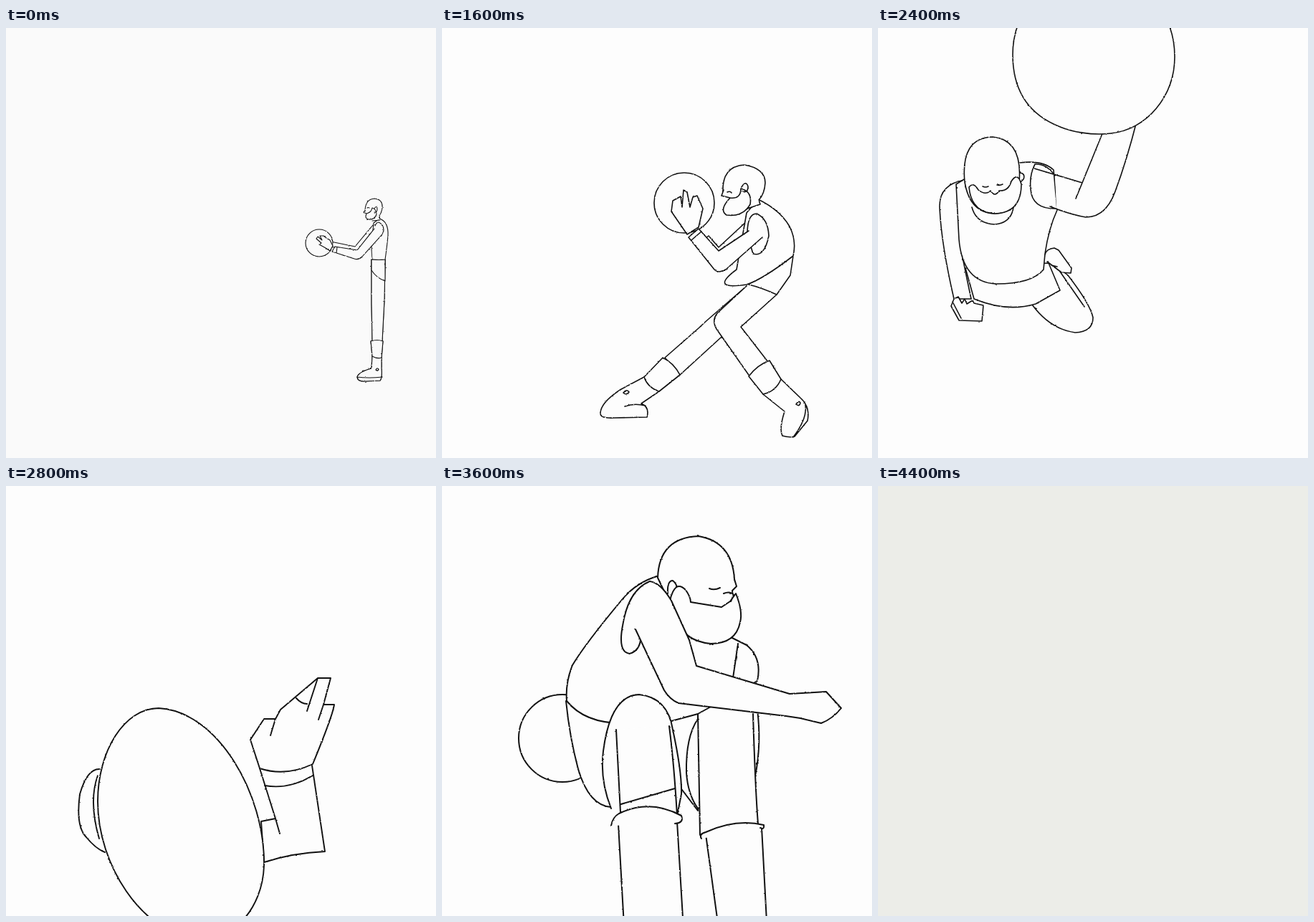
Write an HTML page that moves like this. It is 600 px wide and 600 px high and loops after 4.5 s.

```html
<!DOCTYPE html>
<html lang="en">
<head>
<meta charset="utf-8">
<title>Dunk</title>
<style>
  html, body { margin: 0; height: 100%; overflow: hidden; }
  svg { display: block; width: 600px; height: 600px; background: currentColor; }
  path { fill: currentColor; stroke: #111; stroke-linejoin: round; stroke-linecap: round; vector-effect: non-scaling-stroke; }
</style>
</head>
<body>
<svg id="stage" viewBox="0 0 600 600">
  <filter id="ink" filterUnits="userSpaceOnUse" x="0" y="0" width="600" height="600" color-interpolation-filters="sRGB">
    <feTurbulence type="fractalNoise" baseFrequency=".3" numOctaves="2" seed="4"/>
    <feDisplacementMap in="SourceGraphic" scale="2" xChannelSelector="R" yChannelSelector="G"/>
  </filter>
  <g filter="url(#ink)"><g id="figure"></g></g>
</svg>
<script>
const stage = document.getElementById('stage');
const figure = document.getElementById('figure');

const circle = (x, y, r) =>
  `M${x - r} ${y}a${r} ${r} 0 1 0 ${2 * r} 0a${r} ${r} 0 1 0 ${-2 * r} 0Z`;

// Side view, back to front. Each part: standing, lunge, gather.
const hips = [[519, 315], [398, 328], [455, 330]];
const standLeg = 'M510 323L510 375Q510 380 510 385L511 437L525 437L528 380L529 323';
const standShoe = 'M511 458L510 475Q492 480 490 487Q490 493 500 493L522 492Q525 488 524 475L524 460M490 487Q505 489 525 487M516 477Q518 473 520 476Q519 480 516 477';
const standSock = 'M509 437Q518 434 526 437L524 460Q518 462 511 458Z';

const farArm = [
  'M512 275L487 305L453 298L453 305L489 312L518 282',
  'M352 305L345 319L328 290L322 295L340 326L360 315',
  'M427 268L386 306L372 290L362 298L386 318L438 275'];

const legs = [
  [standLeg,
    'M408 366L440 399Q446 405 452 405L508 406L508 390L455 388L414 336',
    'M425 360L372 406Q365 412 359 418L311 460L332 484L389 432L440 385'],
  [standShoe,
    'M526 405L549 404Q554 412 550 419Q553 424 558 421L565 397Q565 390 555 389L527 391M554 422Q562 405 560 390M544 400Q546 396 548 399Q547 403 544 400',
    'M282 487L250 504Q222 522 221 537Q220 545 240 544L286 543Q290 529 278 524L303 507M255 528Q268 523 284 527M253 509Q258 503 261 508Q257 513 253 509'],
  [standSock,
    'M508 406Q504 398 508 390L527 391Q529 398 526 405Z',
    'M308 460Q323 467 332 484L303 507Q287 502 282 487Z'],
  [standLeg,
    'M380 345L338 343Q330 344 331 352L344 401L360 402L350 363L404 365',
    'M425 360L384 398Q376 408 383 420L430 487L455 466L417 417L467 372'],
  [standShoe,
    'M353 421L356 434Q338 437 336 444Q336 449 346 448L370 450Q375 445 372 432L366 418M337 443Q355 446 374 444M365 434Q367 430 369 433Q368 437 365 434',
    'M448 511L478 535Q470 560 475 569Q485 572 492 570L510 548Q514 528 500 516L473 490M490 571Q510 545 507 526M494 525Q498 519 500 523Q499 529 494 525'],
  [standSock,
    'M343 401Q352 397 361 405L366 418Q362 425 353 421Z',
    'M428 486Q440 470 457 464L473 490Q466 507 448 511Z']];

const shorts = [
  'M510 323L510 338Q517 349 529 353L529 340L529 323Z',
  'M372 343L380 345Q386 353 382 362L410 364L412 340Z',
  'M428 357L428 358Q445 362 467 372L486 345L490 318Z'];
const torso = [
  'M521 266Q534 270 533 290Q531 310 529 323Q520 324 512 323Q510 323 510 300L513 272Z',
  'M368 293Q388 295 404 323Q414 338 412 346Q400 353 380 345Q366 343 363 325L360 305Z',
  'M441 239Q472 254 485 277Q495 297 490 318Q447 351 425 358Q372 366 411 337L425 258Z'];
const ball = [circle(437, 300, 19), circle(316, 271, 19), circle(338, 244, 42)];
const head = [
  'M501 256Q501 239 514 238Q526 239 525 251Q524 258 521 262L522 268L511 269',
  'M344 297Q342 277 356 276Q370 280 368 290Q369 296 365 300L366 302L352 305',
  'M392 230Q390 193 422 191Q451 196 451 216Q450 232 442 240L444 246L426 252'];
const face = [
  'M501 255L499 257L503 259Q500 266 506 267Q514 268 517 260Q517 253 511 251Q510 257 503 259M514 252Q517 247 518 252Q518 258 514 257M504 251Q505 250 507 251',
  'M344 292L341 298L345 299Q341 306 347 308Q354 308 355 298Q356 290 351 289Q350 296 345 299M352 291Q356 287 356 292Q355 297 352 296M346 293Q347 292 349 293',
  'M393 226L390 234L402 237Q386 254 397 261Q420 264 430 246Q433 228 417 224Q417 239 402 237M418 222Q424 212 427 221Q427 231 419 228M398 229Q402 227 404 230'];
const armhole = [
  'M515 276Q517 271 520 271Q527 274 527 282Q525 291 519 294L517 293',
  'M369 294Q372 292 374 297Q380 304 374 314Q369 321 360 322L358 321',
  'M426 284Q427 259 439 259Q455 266 456 290Q450 320 434 315L431 305'];
const nearArm = [
  'M514 280L490 310L459 305L455 312L486 322Q492 324 497 319L524 289',
  'M368 295L341 326L324 288L314 291L331 339Q339 347 347 341L373 311',
  'M428 283L386 311L358 280L344 292L380 337Q386 343 396 337L447 292'];
const hand = [
  'M452 311L446 307L437 302L440 300L433 294L435 291L441 296L438 290L443 290L447 293L452 296L456 304ZM461 314L462 306',
  'M313 283L309 274L310 262L314 262L316 270L317 261L321 261L321 270L323 262L326 262L327 272L324 282ZM314 291L325 288',
  'M342 288L320 256L322 241L333 235L335 250L337 226L342 229L346 250L350 236L356 234L364 252L358 278ZM348 296L362 284'];

const leap = [
  'M215 386Q240 420 275 425Q300 424 300 404Q296 385 265 345L240 325',
  'M233 316Q235 308 246 307L252 310L270 335L269 342L256 341L236 326M242 331L250 333',
  'M122 335L134 378Q180 397 220 385L254 366L238 328ZM254 340L288 389',
  'M121 212Q85 218 86 250Q88 300 106 378L130 378Q124 350 118 320L112 230',
  'M106 378L102 388L113 408L145 409L147 387L134 384L132 380L124 385L121 378L117 384L112 375ZM104 382L116 405',
  'M198 188Q230 184 245 198L250 254Q238 280 233 315L231 337Q215 357 165 357Q118 355 113 295Q110 235 109 218L130 205',
  'M131 250Q137 273 163 274Q186 272 189 250',
  'M218 196L285 216L316 140L361 130Q347 185 331 228Q318 264 290 264Q270 261 240 249M285 216L276 238M247 206Q235 189 219 190Q211 205 213 225Q215 253 249 252',
  'M188 37C188 80 205 115 245 134C270 146 300 150 325 147C375 142 414 95 414 40C414 -30 360 -77 301 -77C240 -77 188 -30 188 37Z',
  'M198 202Q206 203 203 211L198 216M124 214Q119 222 126 226',
  'M121 215Q115 153 160 152Q202 156 197 215Q195 258 163 259Q128 258 121 215',
  'M127 222Q133 214 140 226Q150 234 157 227Q163 237 169 227Q182 228 186 214Q195 200 200 218Q200 258 163 259Q130 257 127 222ZM146 221Q150 223 154 221M166 219Q170 220 174 218'];

const slam = [
  'M130 395Q113 395 103 430Q97 475 112 490Q125 506 138 511M128 404Q115 440 130 492',
  'M354 394L376 464L356 468L360 525Q400 512 445 510L427 390M376 464L382 485',
  'M354 394L341 354L360 325L376 325L383 312L435 268L453 268L443 305L458 305Q456 320 428 388Q390 406 354 394ZM376 325L369 348M435 268L420 314M443 305L436 326M405 296Q412 304 420 304',
  'M361 418Q395 424 428 404',
  'M213 310C295 314 362 430 360 530C358 590 315 640 260 632C190 620 128 530 128 440C128 370 165 310 213 310Z'];

const landing = [
  circle(168, 352, 61),
  'M173 300Q178 350 190 395Q205 446 236 448L332 420L357 453L357 320',
  'M357 325Q340 350 341 400Q343 430 357 450L437 405Q446 360 440 312',
  'M368 486L400 720L459 720L446 476',
  'M357 315L360 487L441 472Q437 420 434 318',
  'M362 492Q358 486 368 483Q410 464 449 473Q450 480 444 477',
  'M300 126Q270 135 250 160Q200 220 182 250Q172 275 174 300Q200 332 255 331L320 328L357 318L440 272Q447 240 425 222L405 212L340 210M413 220L406 268',
  'M246 472L260 720L343 720L328 468',
  'M236 450Q220 410 225 370Q235 292 275 291Q315 295 322 340Q335 400 334 430L328 460M243 340Q246 400 249 455L328 460Q324 390 317 335',
  'M236 474Q238 462 247 457Q290 436 334 460Q338 470 325 471',
  'M315 150Q314 132 322 132Q327 136 328 142L340 210L301 128Q303 72 358 70Q405 78 408 130L411 140L405 146L408 170',
  'M318 160Q325 130 340 145Q347 155 347 162L390 169L402 161L410 150Q420 175 416 190Q410 220 375 220Q335 216 330 185ZM393 150Q402 146 407 152L403 161M373 143Q380 146 388 142',
  'M290 133Q260 145 252 195Q245 232 262 234Q275 230 277 215',
  'M290 133Q305 135 320 160L345 215L355 251L485 290L536 287L557 310Q545 325 529 331L500 324L480 321L330 303Q318 298 310 285L270 200'];

const lerp = (a, b, k) => a + (b - a) * k;
const numbers = path => path.match(/-?\d+/g).map(Number);

// Values of keys [time, ...values] at time t.
function track(t, keys) {
  const i = Math.max(1, keys.findIndex(key => key[0] >= t));
  const a = keys[i - 1], b = keys[i];
  const k = Math.max(0, (t - a[0]) / (b[0] - a[0]));
  return a.slice(1).map((v, j) => lerp(v, b[j + 1], k));
}

const fill = (path, values) => {
  let i = 0;
  return path.replace(/-?\d+/g, () => +values[i++].toFixed(1));
};

function morph(poses, i, k) {
  const to = numbers(poses[i + 1]);
  return fill(poses[i], numbers(poses[i]).map((v, j) => lerp(v, to[j], k)));
}

// Swings a leg around the hip so that it keeps its length.
function swing(poses, i, k) {
  const a = numbers(poses[i]), b = numbers(poses[i + 1]), out = [];
  const polar = (p, j, [x, y]) =>
    [Math.atan2(p[j] - x, p[j + 1] - y), Math.hypot(p[j] - x, p[j + 1] - y)];
  for (let j = 0; j < a.length; j += 2) {
    const [a0, r0] = polar(a, j, hips[i]), [a1, r1] = polar(b, j, hips[i + 1]);
    const angle = lerp(a0, a1, k), r = lerp(r0, r1, k);
    out.push(lerp(hips[i][0], hips[i + 1][0], k) + r * Math.sin(angle),
             lerp(hips[i][1], hips[i + 1][1], k) + r * Math.cos(angle));
  }
  return fill(poses[i], out);
}

function sideView(t) {
  const [p] = track(t, [[300, 0], [800, 1], [1600, 2], [1800, 2]]);
  const i = Math.min(1, Math.floor(p)), k = p - i;
  const part = poses => morph(poses, i, k);
  return [part(farArm), ...legs.map(poses => swing(poses, i, k)),
    ...[shorts, torso, ball, head, face, armhole, nearArm, hand].map(part)];
}

function draw(paths, width, [x, y, scale = 1]) {
  figure.setAttribute('transform', `translate(${x} ${y}) scale(${scale})`);
  figure.setAttribute('stroke-width', width);
  figure.innerHTML = paths.map(d => `<path d="${d}"/>`).join('');
}

function render(t) {
  stage.style.color = t < 1000 ? '#fafafa' : t < 4400 ? '#fdfdfd' : '#ecede8';
  if (t < 2000) {
    const [width] = track(t, [[0, 1.1], [800, 1.1], [1600, 1.6], [1800, 1.6]]);
    draw(sideView(t), width, track(t, [[0, 0, 0], [800, 0, 0], [1200, -150, 25],
      [1600, 0, 0], [1700, 0, -12], [1800, 0, -58]]));
  } else if (t < 2500) {
    draw(leap, 1.6, track(t, [[2000, 250, 110, .7], [2400, 0, 0, 1]]));
  } else if (t < 3200) {
    draw(slam, 1.9, track(t, [[2500, 40, -130], [2600, 30, -100], [2800, 0, 0], [3100, 0, 290]]));
  } else if (t < 4400) {
    draw(landing, 2, track(t, [[3200, 43, 170], [3400, 28, 60], [3600, 0, 0],
      [3700, -78, 28], [4200, -600, 120]]));
  } else {
    draw([], 1, [0, 0]);
  }
}

// Drawn at ten pictures a second, with a few held longer.
const start = performance.now();
let shown = -1;
function tick() {
  let t = Math.floor((performance.now() - start) % 4500 / 100) * 100;
  if (t < 400) t = 0;
  if (t === 1900 || t === 4300) t -= 100;
  if (t !== shown) render(shown = t);
  requestAnimationFrame(tick);
}
tick();
</script>
</body>
</html>
```
